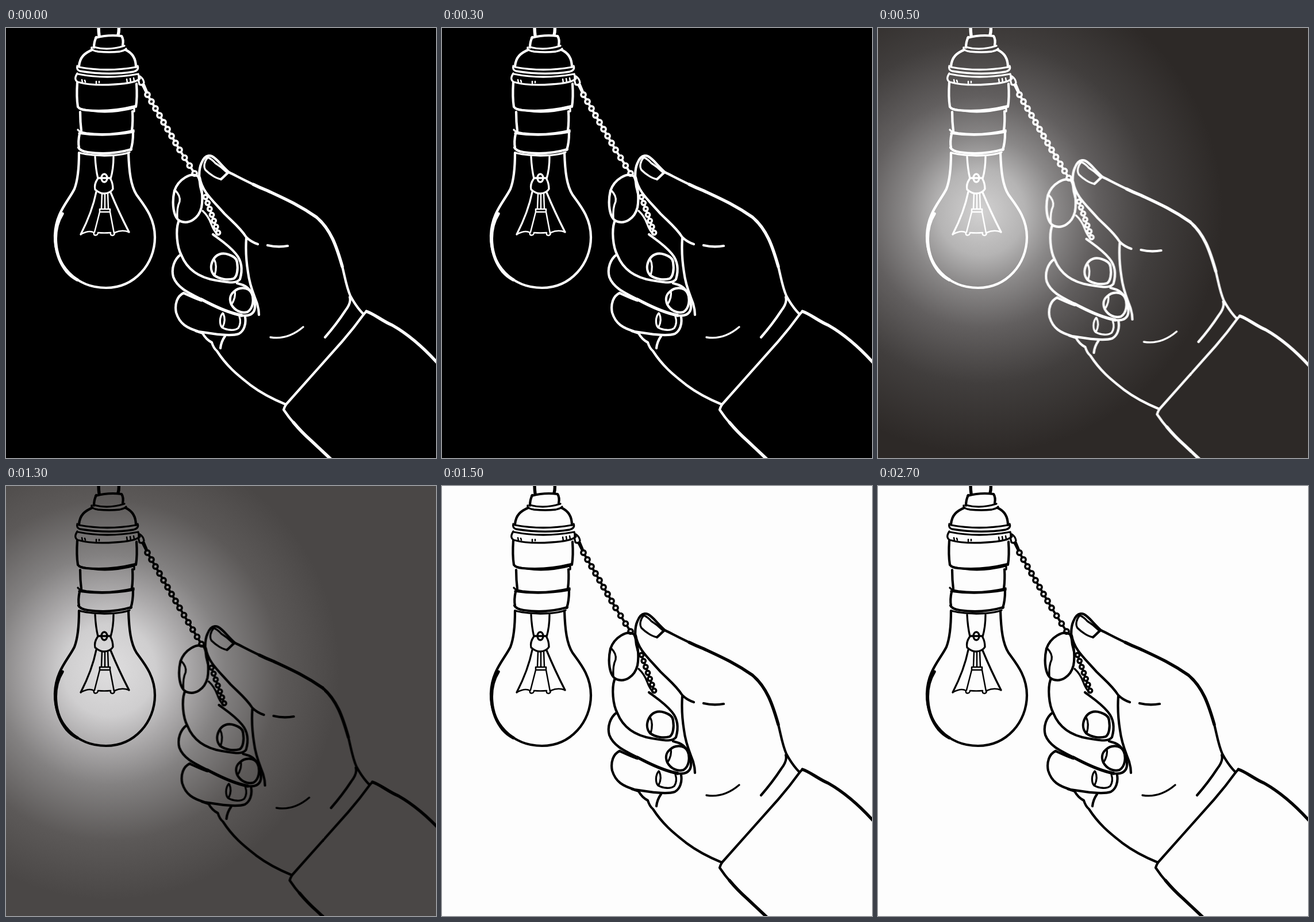
Recreate the animation shown at these times as an HTML page. Size 748x748 px, loop 3500 ms.

```html
<!DOCTYPE html>
<html lang="en">
<head>
<meta charset="utf-8">
<title>Light bulb and pull chain</title>
<style>
html, body { margin: 0; width: 100%; height: 100%; overflow: hidden; background: #000; }
svg {
  display: block; width: 100vw; height: 100vh;
  fill: none; stroke-width: 4.2; stroke-linecap: round; stroke-linejoin: round;
  animation: scene 3.5s step-end infinite;
}
.bold { stroke-width: 5.4; }
.thin { stroke-width: 3.3; }
.fine { stroke-width: 2.5; }
.glow { stroke: none; }
#hand { animation: tug 3.5s step-end infinite; }
.rest { animation: rest 3.5s step-end infinite; }
.dim { animation: dim 3.5s step-end infinite; }
.lit { animation: lit 3.5s step-end infinite; }

@keyframes scene {
  0% { background-color: #000; stroke: #fff; }
  14.2857% { background-color: #2d2927; stroke: #fff; }
  28.5714% { background-color: #4a4746; stroke: #000; }
  42.8571%, 100% { background-color: #fdfdfd; stroke: #000; }
}
@keyframes tug {
  0% { transform: translate(0, 0); }
  14.2857% { transform: translate(2.5px, 8px); }
  28.5714% { transform: translate(10.5px, 22px); }
  42.8571%, 100% { transform: translate(0, 0); }
}
@keyframes rest {
  0% { opacity: 1; }
  14.2857% { opacity: 0; }
  42.8571%, 100% { opacity: 1; }
}
@keyframes dim {
  0% { opacity: 0; }
  14.2857% { opacity: 1; }
  28.5714%, 100% { opacity: 0; }
}
@keyframes lit {
  0% { opacity: 0; }
  28.5714% { opacity: 1; }
  42.8571%, 100% { opacity: 0; }
}
</style>
</head>
<body>
<svg viewBox="0 0 748 748">
  <defs>
    <radialGradient id="dimGlow" gradientUnits="userSpaceOnUse" cx="180" cy="320" r="420">
      <stop offset="0" stop-color="#d2d1d1"/>
      <stop offset=".18" stop-color="#b5b4b4"/>
      <stop offset=".31" stop-color="#8a8888"/>
      <stop offset=".48" stop-color="#625f5f"/>
      <stop offset=".71" stop-color="#413e3d"/>
      <stop offset="1" stop-color="#2d2927"/>
    </radialGradient>
    <radialGradient id="litGlow" gradientUnits="userSpaceOnUse" cx="180" cy="320" r="400">
      <stop offset="0" stop-color="#dfdedf"/>
      <stop offset=".2" stop-color="#cfcecf"/>
      <stop offset=".33" stop-color="#adabac"/>
      <stop offset=".5" stop-color="#838181"/>
      <stop offset=".74" stop-color="#5c5958"/>
      <stop offset="1" stop-color="#4a4746"/>
    </radialGradient>
  </defs>

  <rect class="glow dim" width="748" height="748" fill="url(#dimGlow)"/>
  <rect class="glow lit" width="748" height="748" fill="url(#litGlow)"/>

  <g id="socket">
    <path class="bold" d="M161 -4Q161 6 162 13M196 -4Q197 6 195 12"/>
    <path d="M156 17Q178 11 201 14Q205 20 203 30M157 16Q153 24 153 34"/>
    <path class="thin" d="M152 33Q178 40 206 31M149 34C148 38 153 40 160 41Q180 43 198 41Q207 39 209 36"/>
    <path d="M150 38C138 43 128 50 127 67M208 38C219 43 226 52 226 68"/>
    <path class="thin" d="M124 66Q122 73 129 75Q178 83 222 76Q232 73 229 66M127 68Q176 77 226 68"/>
    <path class="thin" d="M124 79Q117 90 125 94Q150 101 190 98Q225 96 233 88M125 80Q175 90 230 80L232 87"/>
    <path class="fine" d="M132 90l1 5M137 91l1 3M157 93v3M162 93v2M210 89l1 6M216 88l1 6M222 87l1 5"/>
    <path d="M124 95C123 110 123 125 125 137M227 97C228 112 228 125 226 137"/>
    <path d="M125 137Q128 142 140 143Q180 147 225 136"/>
    <path class="thin" d="M128 140Q172 152 223 139V145"/>
    <path d="M129 146Q129 163 131 179M220 145Q221 163 219 178"/>
    <path class="thin" d="M125 177Q127 181 140 183Q180 188 222 178M127 183Q172 190 222 181V178"/>
    <path d="M128 184Q125 198 127 208M221 183Q221 200 217 212"/>
    <path d="M126 208Q129 214 142 216Q180 222 218 211"/>
    <path class="thin" d="M128 217Q140 221 171 222Q200 222 215 216"/>
  </g>

  <g id="bulb">
    <path d="M127 217C127 240 126 262 119 280C108 302 86 322 85 361C84 412 122 452 174 452C224 452 259 410 259 364C259 330 240 308 227 290C217 274 214 250 213 217"/>
    <path class="bold" d="M98 323C80 352 83 396 106 424Q114 433 124 438"/>
    <g class="thin">
      <path d="M155 224Q156 245 160 262M187 224Q187 245 182 262M160 261H182"/>
      <ellipse cx="171" cy="261" rx="5" ry="7"/>
      <path d="M159 263Q153 272 155 281Q163 288 171 288Q182 287 186 280Q186 270 182 263"/>
      <path d="M157 285Q150 320 130 359M182 286Q196 320 214 355"/>
    </g>
    <g class="fine">
      <path d="M167 288L166 314M172 288V314M177 288L178 314M163 315H181V320H163ZM163 320L154 355M181 320L188 357"/>
      <path d="M130 359Q145 351 153 356C151 362 160 362 160 356Q171 357 182 356C180 362 189 363 189 356Q202 350 214 355"/>
    </g>
  </g>

  <g id="chain">
    <path class="thin" d="M231 85Q230 92 232 98Q238 101 240 95Q239 88 233 84M237 99L243 111M240 98L245 110"/>
  </g>

  <g id="hand">
    <path d="M341 288C337 275 333 250 340 235C344 225 350 220 358 223C368 228 375 240 388 251C410 262 430 273 455 283C485 297 510 308 540 329C565 350 575 380 585 415C590 435 592 450 599 466C606 479 613 489 622 498"/>
    <path class="bold" d="M430 272Q442 278 455 283C485 297 510 308 540 329C565 350 575 380 585 415"/>
    <path class="thin" d="M351 225C345 232 343 241 347 247C355 255 366 262 374 263M351 225Q358 228 364 235Q374 241 383 250"/>
    <path d="M374 263C379 259 382 255 387 251"/>
    <path d="M337 260C341 285 360 300 380 323C395 338 408 348 418 364Q426 372 438 376"/>
    <path d="M334 258C322 250 300 263 293 283C288 305 291 330 303 336C318 342 335 332 340 312C343 297 341 272 334 258"/>
    <path class="thin" d="M294 282Q304 292 302 302Q297 312 298 331"/>
    <path d="M300 337C295 352 297 380 305 395C315 420 335 434 365 439C385 442 400 446 407 437C412 420 410 405 400 393C388 378 372 368 360 359"/>
    <path class="thin" d="M342 318Q352 327 357 341Q361 352 367 358"/>
    <path d="M360 404C365 394 375 390 387 394C396 397 402 402 402 408C404 420 402 432 396 436C385 439 371 437 362 430C355 422 356 412 360 404"/>
    <path class="thin" d="M362 402Q368 414 363 430"/>
    <path d="M304 394C293 402 287 418 291 433C298 452 318 461 340 472C362 484 390 496 410 500C425 502 434 496 433 482C431 465 425 452 412 447L402 444"/>
    <path class="bold" d="M340 472C362 484 390 496 410 500"/>
    <path d="M396 459C405 450 420 450 427 460C432 472 430 488 420 494C410 497 398 492 392 481C388 472 390 464 396 459"/>
    <path class="thin" d="M398 458Q400 470 392 481"/>
    <path d="M309 461C298 466 293 480 296 495C302 515 315 522 335 528C360 532 390 537 405 532C414 527 418 515 416 503"/>
    <path d="M309 461C320 466 330 471 340 474"/>
    <path class="thin" d="M377 496C371 503 371 516 376 521C385 526 398 527 404 522C408 516 408 508 406 502M378 497Q383 508 377 520"/>
    <path d="M418 366C417 380 417 400 421 425C424 450 432 465 437 480Q440 490 440 499"/>
    <path d="M455 378Q472 382 490 379"/>
    <path class="thin" d="M460 538Q490 543 517 520"/>
    <path d="M598 468Q601 478 590 492Q575 515 555 538"/>
    <path d="M330 527L342 531Q348 542 358 547Q361 557 367 562C385 590 405 605 425 621C445 636 465 646 487 655M381 536Q374 546 373 557"/>
    <path d="M487 655Q545 590 585 545Q605 522 623 497L627 493M487 655Q484 660 483 664Q500 690 530 717L563 748L600 785"/>
    <path class="bold" d="M627 493C640 497 655 510 672 517C700 533 725 555 748 580L775 610M500 686Q514 703 530 717L563 748L600 785"/>
  </g>
</svg>
<script>
const NS = 'http://www.w3.org/2000/svg';

function add(parent, tag, attrs) {
  const el = document.createElementNS(NS, tag);
  for (const key in attrs) el.setAttribute(key, attrs[key]);
  return parent.appendChild(el);
}

// Evenly spaced rings from a to b, joined by short links.
function beads(parent, a, b, steps, r, first = 0) {
  for (let i = first; i <= steps; i++) {
    const k = i / steps;
    add(parent, 'circle', {
      cx: a[0] + (b[0] - a[0]) * k,
      cy: a[1] + (b[1] - a[1]) * k,
      r, 'stroke-width': 3.6
    });
  }
  const gap = Math.hypot(b[0] - a[0], b[1] - a[1]) / steps;
  add(parent, 'path', {
    d: `M${a}L${b}`, 'stroke-width': 4, 'stroke-linecap': 'butt',
    'stroke-dasharray': `${gap - 2 * r} ${2 * r}`, 'stroke-dashoffset': -r
  });
}

const chain = document.getElementById('chain');
const joint = [302, 212];
beads(chain, [246, 116], joint, 8, 4.1);

const tails = { rest: [328, 253, 3], dim: [332, 261, 4], lit: [340, 275, 5] };
for (const name in tails) {
  const [x, y, steps] = tails[name];
  beads(add(chain, 'g', { class: name }), joint, [x, y], steps, 4.1, 1);
}

const hand = document.getElementById('hand');
beads(hand, [347, 294], [369, 356], 6, 3.6);
</script>
</body>
</html>
```
